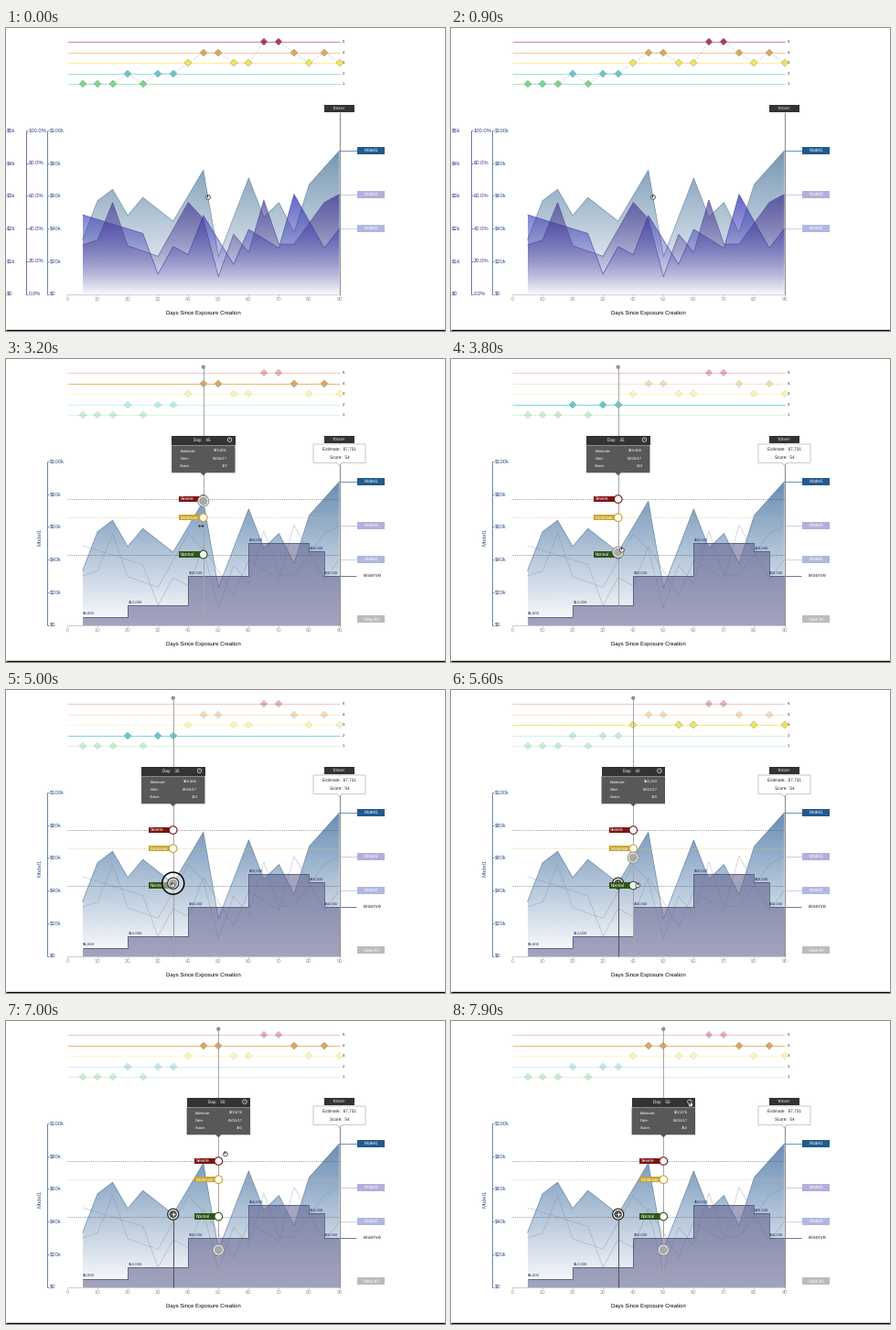
Animation, 480 px wide and 331 px high, one loop 8 s. Source, as a matplotlib script:

```python
from itertools import count

import numpy as np
import matplotlib.pyplot as plt
from matplotlib.animation import FuncAnimation
from matplotlib.lines import Line2D
from matplotlib.patches import Circle, Polygon, Rectangle
from matplotlib.text import Text
from matplotlib.transforms import Affine2D

W, H, DPI = 480, 331, 100
PX = 72 / DPI
FRAMES, STEP = 80, 100
BASE, PER_K = 290.5, 1.785

plt.rcParams["font.family"] = "Liberation Sans"
plt.rcParams["text.hinting"] = "none"
fig = plt.figure(figsize=(W / DPI, H / DPI), dpi=DPI, facecolor="white")
ax = fig.add_axes([0, 0, 1, 1])
ax.axis("off")

NAVY, INDIGO, GREY, DARK = "#35588c", "#3a3a90", "#9a9a9a", "#333333"


def day_x(day):
    return 67 + 3.306 * day


def money_y(k):
    return BASE - PER_K * np.asarray(k)


def series(keys):
    """One value every five days, straight between turning points {day: value}."""
    return np.interp(days, list(keys), list(keys.values()))


days = np.arange(5, 91, 5)
xs = day_x(days)
model1 = series({5: 33, 10: 57, 15: 64, 20: 48, 25: 59, 35: 44.466, 45: 75.801,
                 50: 22.676, 60: 71, 65: 47, 70: 56, 75: 37.5, 80: 67, 90: 87.731})
model2 = series({5: 48.5, 25: 37, 30: 12, 35: 29, 40: 24, 45: 48, 55: 18,
                 60: 39.5, 70: 28, 75: 61, 85: 28, 90: 40})
model3 = series({5: 30, 10: 33, 15: 56, 20: 29.5, 30: 23, 40: 56, 45: 46, 50: 10.5,
                 55: 36.5, 60: 25.5, 65: 57.5, 70: 30.5, 75: 30.5, 85: 56, 90: 61})
ratings = np.round(series({15: 1, 20: 2, 25: 1, 35: 2, 45: 4, 55: 3, 60: 3,
                           65: 5, 70: 5, 80: 3, 85: 4, 90: 3}))
reserve = {5: 5, 20: 12, 40: 30, 60: 50, 80: 45, 85: 30}
scores = {35: 244, 40: 183, 45: 107, 50: 340}

overview, detail, hover, pin = [], [], [], []
order = count(1)
shift, cursor_shift = Affine2D(), Affine2D()
hover_tf = shift + ax.transData
cursor_tf = cursor_shift + ax.transData


def smooth(u):
    u = np.clip(u, 0, 1)
    return u * u * (3 - 2 * u)


def add(artist, group=None):
    artist.set_zorder(next(order))
    ax.add_artist(artist)
    if group is not None:
        group.append((artist, artist.get_alpha() or 1))
    return artist


def tf(group):
    return hover_tf if group is hover else ax.transData


def line(x, y, color, lw=1, group=None, **kw):
    return add(Line2D(x, y, color=color, lw=lw * PX, transform=tf(group),
                      solid_capstyle="butt", **kw), group)


def box(x, y, w, h, color, group=None, **kw):
    return add(Rectangle((x, y), w, h, fc=color, transform=tf(group), **kw), group)


def disc(x, y, r, fill, edge, lw, group=None):
    return add(Circle((x, y), r, fc=fill, ec=edge, lw=lw * PX, transform=tf(group)), group)


def text(x, y, s, size, color="black", ha="center", group=None, **kw):
    return add(Text(x, y, s, fontsize=size * PX, color=color, ha=ha, va="center",
                    transform=tf(group), **kw), group)


def bubble(x, y, w, h, tip, color, group, **kw):
    """Box with a small pointer below x = tip."""
    low = y + h
    pts = [(x, y), (x + w, y), (x + w, low), (tip + 3, low), (tip, low + 3),
           (tip - 3, low), (x, low)]
    add(Polygon(pts, fc=color, transform=tf(group), **kw), group)


def area(values, rgb, alpha, group, stroke):
    """Series line over a fill that fades towards the baseline."""
    y = money_y(values)
    fade = np.ones((128, 2, 4))
    fade[..., :3] = np.array(rgb) / 255
    fade[..., 3] = np.linspace(alpha, 0.02, 128)[:, None]
    im = ax.imshow(fade, extent=(xs[0], xs[-1], BASE, y.min()),
                   aspect="auto", interpolation="bilinear")
    outline = [(xs[0], BASE), *zip(xs, y), (xs[-1], BASE)]
    im.set_clip_path(Polygon(outline, transform=ax.transData))
    im.set_zorder(next(order))
    group.append((im, 1))
    line(xs, y, stroke, .7, group, alpha=.85)


def y_axis(x, labels, color, group=None):
    line([x, x], [money_y(100), BASE + .5], color, .9, group, alpha=.8)
    for y, s in zip(np.linspace(BASE, money_y(100), len(labels)), labels):
        line([x, x + 2.4], [y, y], color, .8, group, alpha=.8)
        text(x + 3.2, y, s, 5.9, color, "left", group)


# Rating strip
level_y = [61 - 11.4 * n for n in range(5)]
level_lines, level_marks = [], []
line(xs, [level_y[int(r) - 1] for r in ratings], "#cfccde", .8, overview,
     dashes=(2.5, 2))
for n, color in enumerate(["#74d98c", "#5ccbd0", "#f3e64e", "#e3a550", "#b23a55"]):
    y = level_y[n]
    level_lines.append(line([day_x(0), day_x(90)], [y, y], color, .9))
    text(368, y, n + 1, 4.4, "#222222", "left")
for n, rail in enumerate(level_lines, 1):
    at = xs[ratings == n]
    level_marks.append(line(at, np.full(len(at), level_y[n - 1]), rail.get_color(), 0,
                            ls="none", marker="D", ms=5.2 * PX, mec="#9a9a9a", mew=.3))

# Axes
thousands = [f"${k}k" if k else "$0" for k in range(0, 101, 20)]
y_axis(-2.2, [f"${k}k" if k else "$0" for k in range(6)], INDIGO, overview)
y_axis(21.5, [f"{p}.0%" for p in range(0, 101, 20)], INDIGO, overview)
y_axis(44.6, thousands, NAVY)
text(37, 194, "Model1", 5.9, NAVY, group=detail, rotation=90)
line([day_x(0), day_x(90)], [291, 291], "#c0c0c0", .8)
for d in range(0, 91, 10):
    line([day_x(d)] * 2, [291, 293], "#c0c0c0", .8)
    text(day_x(d), 296.7, d, 5.9, GREY)
text(215.5, 311, "Days Since Exposure Creation", 5.95)
line([0, W], [330.3, 330.3], "black", 1.4)

# Areas
area(model1, (72, 116, 155), .76, overview, "#6384a0")
area(model2, (54, 56, 180), .78, overview, "#4646aa")
area(model3, (66, 52, 145), .72, overview, "#554a96")
area(model1, (72, 116, 163), .82, detail, "#55799f")
for values in (model2, model3):
    line(xs, money_y(values), "#7f879f", .7, detail, alpha=.45)

# Reserve steps
edges = [*reserve, 90]
step_x = day_x(np.repeat(edges, 2)[1:-1])
step_y = money_y(np.repeat(list(reserve.values()), 2))
add(Polygon([(xs[0], BASE), *zip(step_x, step_y), (xs[-1], BASE)],
            fc="#62628f", alpha=.58, lw=0), detail)
line([*step_x, 383], [*step_y, step_y[-1]], "#4a587c", .8, detail)
for d, k in reserve.items():
    text(day_x(d) + .4, money_y(k) - 3, f"${k},000", 4.2, "#1d2c55", "left", detail)
text(390.5, 236, "reserve", 6, "#444444", "left", detail)

limits = [("Severe", 77, "#7c1414", "#555555"),
          ("Moderate", 65.7, "#c9a42c", "#d8be66"),
          ("Normal", 43.1, "#2f5518", "#555555")]
for _, k, _, dots in limits:
    line([day_x(0), day_x(90)], [money_y(k)] * 2, dots, .8, detail,
         dashes=(1.2, 1.7), alpha=.85)

# Today marker and side buttons
today = day_x(90)
line([today] * 2, [92, 291], "#929292", 1.2)
box(348, 83.7, 32.5, 8.6, DARK, lw=0)
text(364.3, 88, "TODAY", 4.4, "white")
bubble(336, 93, 57, 20.3, today, "white", detail, ec="#b0b0b0", lw=.5)
text(364.5, 99, "Estimate:  87,731", 4.75, "#222222", group=detail)
text(364.5, 107.2, "Score:  54", 4.75, "#222222", group=detail)


def button(y, s, color, group=None):
    box(384, y - 4, 30, 8, color, group, lw=0)
    text(399, y, s, 4.8, "white", group=group)


for s, values, color in (("Model1", model1, "#235a8e"), ("Model3", model3, "#b6aeda"),
                         ("Model2", model2, "#b0b8e0")):
    y = money_y(values[-1])
    line([today, 384], [y, y], color, .8, alpha=.8)
    button(y, s, color)
button(284.2, "View All", "#bcbcbc", detail)

# Pinned day
pin_x, pin_y = day_x(35), money_y(44.466)
line([pin_x] * 2, [pin_y, 291], "#555555", 1.1, pin)
disc(pin_x, pin_y, 6, "white", "#222222", 1.2, pin)
disc(pin_x, pin_y, 4, "#555555", "#555555", .5, pin)
for dx, dy in ((1.8, 0), (0, 1.8)):
    line([pin_x - dx, pin_x + dx], [pin_y - dy, pin_y + dy], "white", .9, pin)

# Hover guide, drawn around x = 0 and shifted to the active day
line([0, 0], [8.5, 291], "#a6a6a6", 1, hover)
disc(0, 8.7, 1.8, "#959595", "#858585", .6, hover)
for name, k, color, _ in limits:
    y = money_y(k)
    box(-26.5, y - 3.2, 26, 6.4, color, hover, lw=0)
    text(-25, y, name, 4.6, "white", "left", hover)
    disc(0, y, 4.3, "white", color, 1.1, hover)
ring = disc(pin_x, pin_y, 12, (1, 1, 1, .4), "black", 1.5)
marker = [disc(0, 0, 6, "white", "#8a8a8a", 1, hover),
          disc(0, 0, 4.2, "#a9a9a9", "#999999", .6, hover)]
box(-34.7, 83.5, 69.5, 10, DARK, hover, lw=0)
bubble(-34.7, 94.3, 69.5, 30, 0, "#585858", hover, lw=0)
day_label = text(-2, 88.4, "", 4.6, "white", group=hover)
disc(28.7, 88.2, 2.3, "none", "white", .6, hover)
text(28.7, 88.4, "i", 3.8, "white", group=hover)
values_text = []
for n, name in enumerate(("Estimate:", "Date:", "Score:")):
    y = 100.5 + 8.3 * n
    text(-25.5, y, name, 4.15, "white", "left", hover)
    values_text.append(text(26.5, y, "", 4.15, "white", "right", hover))

# Cursor
hand = [disc(0, .4, 2.4, "#f4f4f4", "#444444", .8),
        line([-.6, -.6], [-3, 0], "#444444", 1.2)]
arrows = [text(0, 0, "\u2194", 8, "#222222", family="DejaVu Sans")]
for part in hand + arrows:
    part.set_transform(cursor_tf)

ax.set_xlim(0, W)
ax.set_ylim(H, 0)

# (start, duration, x, y) of each cursor move
MOVES = [(3, .2, 213, 183), (3.2, .8, 182, 213), (5.2, .6, 212, 213), (6.3, 1.3, 262, 91)]


def cursor_at(t):
    pos = np.array([221, 184.5])
    for start, length, x, y in MOVES:
        pos = pos + (np.array([x, y]) - pos) * smooth((t - start) / length)
    return pos


def show(artists, on):
    for artist in artists:
        artist.set_visible(on)


def draw(i):
    t = i * STEP / 1000
    fade = float(np.clip((i - 9) / 5, 0, 1))
    for group, amount in ((overview, 1 - fade), (detail, fade), (hover, fade)):
        for artist, alpha in group:
            artist.set_alpha(alpha * amount)
            artist.set_visible(amount > 0)

    cx, cy = cursor_at(t)
    cursor_shift.clear().translate(cx, cy)
    resizing = 3.05 < t < 3.75
    show(hand, not resizing)
    show(arrows, resizing)

    day = min(50, 5 * round((cx - day_x(0)) / (day_x(5) - day_x(0))))
    k = day // 5 - 1
    shift.clear().translate(day_x(day), 0)
    for m in marker:
        m.set_center((0, money_y(model1[k])))
    day_label.set_text(f"Day:   {day}")
    details = f"${1000 * model1[k]:,.0f}", f"08/{day - 19}/17", scores[day]
    for label, s in zip(values_text, details):
        label.set_text(s)
    for n, (rail, marks) in enumerate(zip(level_lines, level_marks), 1):
        active = n == ratings[k]
        rail.set_alpha(.65 + (.2 if active else -.35) * fade)
        marks.set_alpha(1 if active else 1 - .62 * fade)

    pinned = t > 4.85
    show([artist for artist, _ in pin], pinned)
    marker[0].set_edgecolor("#222222" if pinned and day == 35 else "#8a8a8a")
    ring.set_visible(4.75 < t < 5.05)
    ring.set_radius(8 + 4 * smooth((t - 4.7) / .3))
    return []


anim = FuncAnimation(fig, draw, frames=FRAMES, interval=STEP, repeat=True,
                     repeat_delay=0, blit=False)
plt.show()
```
